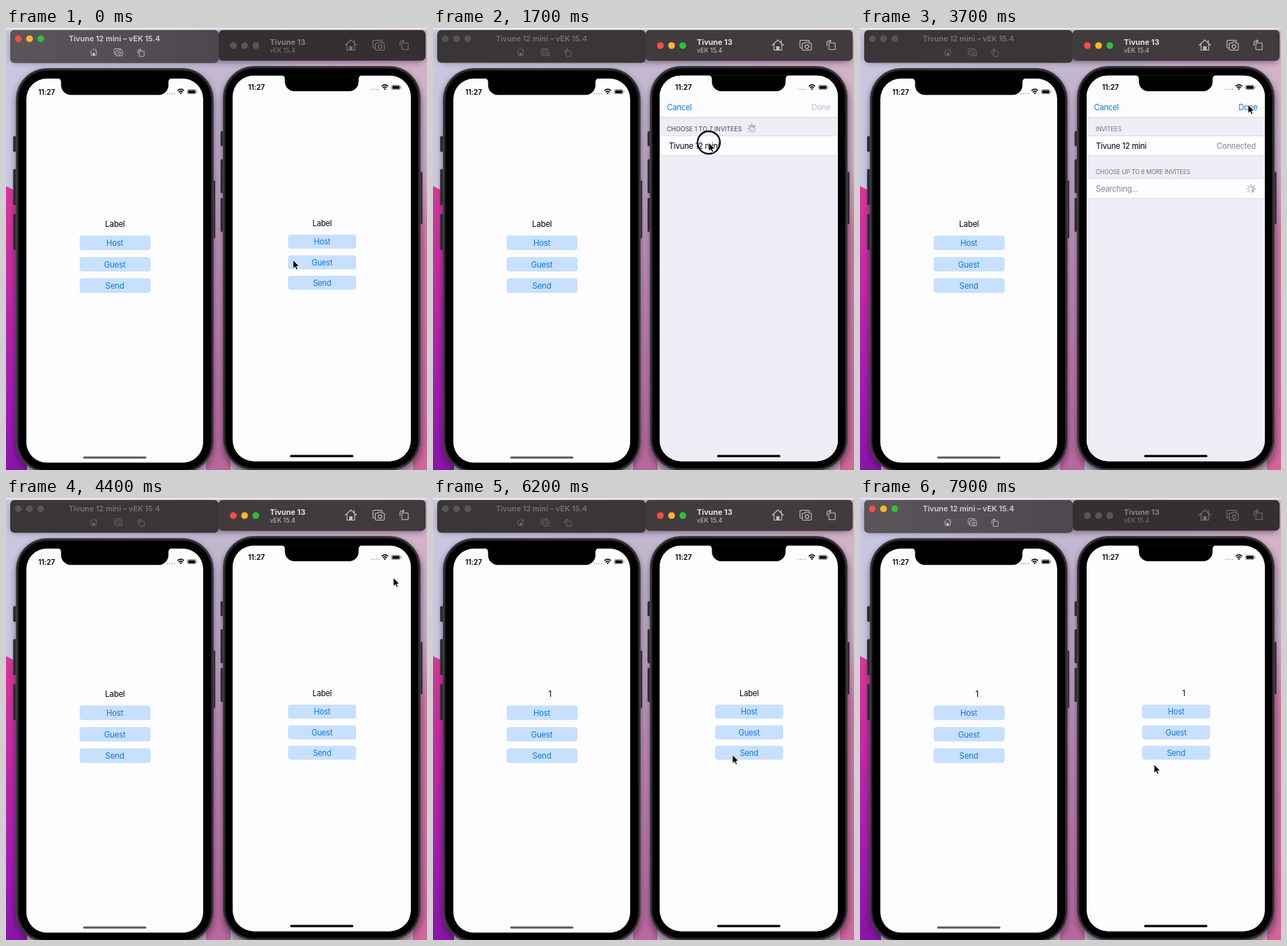
An HTML page for the animation above (8000 ms loop, 600x629 px).

```html
<!DOCTYPE html>
<html lang="en">
<head>
<meta charset="utf-8">
<title>Two simulators</title>
<style>
html, body { margin: 0; width: 100%; height: 100%; overflow: hidden; background: #b7aecb; }
svg { display: block; width: 600px; height: 629px; }
text { font-family: Inter, "Open Sans", sans-serif; }

.mini text { font-size: 11.4px; letter-spacing: -.22px; }
.big text { font-size: 11.1px; letter-spacing: -.2px; }
.mid text, text.mid { text-anchor: middle; }
.end { text-anchor: end; }
.blue { fill: #0f78e2; }
.grey { fill: #858488; }
.pale { fill: #bdbcc3; }
g.head text { font-size: 8.46px; letter-spacing: -.14px; fill: #737278; }
g.head text.wide { font-size: 8.8px; letter-spacing: 0; fill: #454449; }
.clock text { font-size: 10.3px; font-weight: 600; letter-spacing: -.1px; text-anchor: middle; }
.btn { fill: #c7e0fe; }
.title { font-size: 10.8px; font-weight: 600; }
.strong { font-weight: 700; }
.sub { font-size: 9px; }
.icon { fill: none; stroke: currentColor; stroke-width: 1.1; stroke-linejoin: round; stroke-linecap: round; }

/* Hard switches and motion share one 8 s clock */
.sw { animation: 8s step-end infinite; }
.move { animation: 8s ease-in-out infinite; }
.leftOn { animation-name: leftOn; }
.rightOn { animation-name: rightOn; }
.leftOld { animation-name: leftOld; }
.leftNew { animation-name: leftNew; }
.rightOld { animation-name: rightOld; }
.rightNew { animation-name: rightNew; }
.choose { animation-name: choose; }
.joined { animation-name: joined; }
.connecting { animation-name: connecting; }
.connected { animation-name: connected; }
.ring { animation-name: ring; }
.sheet { animation-name: sheet; }
.pointer { animation-name: pointer; }
.spin { animation: spin 1s steps(8) infinite; }

@keyframes leftOn { 0% { opacity: 1 } 2.5% { opacity: 0 } 88.75%, 100% { opacity: 1 } }
@keyframes rightOn { 0% { opacity: 0 } 2.5% { opacity: 1 } 88.75%, 100% { opacity: 0 } }
@keyframes leftOld { 0% { opacity: 1 } 72.5%, 100% { opacity: 0 } }
@keyframes leftNew { 0% { opacity: 0 } 72.5%, 100% { opacity: 1 } }
@keyframes rightOld { 0% { opacity: 1 } 90%, 100% { opacity: 0 } }
@keyframes rightNew { 0% { opacity: 0 } 90%, 100% { opacity: 1 } }
@keyframes choose { 0% { opacity: 1 } 22.5%, 100% { opacity: 0 } }
@keyframes joined { 0% { opacity: 0 } 22.5%, 100% { opacity: 1 } }
@keyframes connecting { 0% { opacity: 1 } 27.5%, 100% { opacity: 0 } }
@keyframes connected { 0% { opacity: 0 } 27.5%, 100% { opacity: 1 } }
@keyframes ring {
  0% { opacity: 0 } 1.25% { opacity: 1 } 3.75% { opacity: 0 }
  20% { opacity: 1 } 22.5% { opacity: 0 }
  47.5% { opacity: 1 } 50% { opacity: 0 }
  68.75% { opacity: 1 } 71.25% { opacity: 0 }
  87.5% { opacity: 1 } 90%, 100% { opacity: 0 }
}
@keyframes sheet {
  0%, 5% { transform: translateY(550px); animation-timing-function: cubic-bezier(.2, .7, .4, 1) }
  11.25% { transform: translateY(10px); animation-timing-function: ease-out }
  12.5%, 50% { transform: translateY(0); animation-timing-function: cubic-bezier(.3, .5, .3, 1) }
  56.25%, 100% { transform: translateY(550px) }
}
@keyframes pointer {
  0%, 3.75% { transform: translate(409px, 330px) }
  8.75%, 12.5% { transform: translate(420px, 329px) }
  19%, 33.75% { transform: translate(393px, 163px) }
  43.75%, 54% { transform: translate(553px, 109px) }
  65%, 73.75% { transform: translate(487px, 364px) }
  86.25%, 90% { transform: translate(167px, 371px) }
  97.5%, 100% { transform: translate(419px, 379px) }
}
@keyframes spin { to { transform: rotate(360deg) } }
</style>
</head>
<body>
<svg viewBox="0 0 600 629" xmlns="http://www.w3.org/2000/svg">
<defs>
  <linearGradient id="sky">
    <stop offset="0" stop-color="#c9c7e0"/><stop offset=".5" stop-color="#c3b7d0"/><stop offset="1" stop-color="#d2b2c8"/>
  </linearGradient>
  <linearGradient id="flame" x2="0" y2="1">
    <stop offset="0" stop-color="#d8379a"/><stop offset=".35" stop-color="#c12aa4"/><stop offset=".75" stop-color="#a01bb2"/><stop offset="1" stop-color="#8915a6"/>
  </linearGradient>
  <linearGradient id="gap" x2="0" y2="1">
    <stop offset="0" stop-color="#c3b7d0"/><stop offset=".25" stop-color="#bda4c4"/><stop offset=".5" stop-color="#c08ab2"/><stop offset="1" stop-color="#b8679c"/>
  </linearGradient>
  <linearGradient id="edge" x2="0" y2="1">
    <stop offset="0" stop-color="#d2b2c8"/><stop offset=".18" stop-color="#cfaecb"/><stop offset=".36" stop-color="#cf7ba6"/><stop offset="1" stop-color="#d2669c"/>
  </linearGradient>
  <linearGradient id="barLit"><stop offset="0" stop-color="#5b555a"/><stop offset="1" stop-color="#4d484d"/></linearGradient>
  <filter id="soft" x="-20%" y="-10%" width="140%" height="120%"><feGaussianBlur stdDeviation="5"/></filter>
  <clipPath id="bigScreen"><rect x="323" y="67.800" width="254" height="548.600" rx="30"/></clipPath>

  <g id="home" class="icon">
    <path d="M-8 0 L0 -7.5 L8 0 M-5.5 -1.5 V7 H5.5 V-1.5 M4.8 -3.5 V-7"/>
    <path d="M-1.7 7 V2 H1.7 V7" fill="currentColor"/>
  </g>
  <g id="shot" class="icon">
    <path d="M-5.5 4 H-6.5 Q-8 4 -8 2.5 V-5.5 Q-8 -7 -6.5 -7 H4 Q5.5 -7 5.5 -5.5 V-5"/>
    <path d="M-3.5 -3 H-1 L0 -4.5 H4 L5 -3 H7 Q8.2 -3 8.2 -1.8 V5.8 Q8.2 7 7 7 H-3.3 Q-4.7 7 -4.7 5.8 V-1.8 Q-4.7 -3 -3.5 -3 Z"/>
    <circle cx="2" cy="2" r="2.6"/>
  </g>
  <g id="turn" class="icon">
    <rect x="-3.5" y="-2.8" width="9.5" height="10" rx="1"/>
    <path d="M-6.3 1 V-3 Q-6.3 -5.8 -3.5 -5.8 H-.5 M-2 -7.5 L-.3 -5.8 L-2 -4.1"/>
  </g>

  <g id="leftBar" fill="currentColor">
    <text class="title mid" x="154.5" y="18.7">Tivune 12 mini – vEK 15.4</text>
    <use href="#home" transform="translate(125 34.5) scale(.65)"/>
    <use href="#shot" transform="translate(160 34.5) scale(.72)"/>
    <use href="#turn" transform="translate(192.5 35) scale(.74)"/>
  </g>
  <g id="rightBar" fill="currentColor">
    <text class="title strong" x="376" y="23.6">Tivune 13</text>
    <text class="sub" x="376" y="34.5" opacity=".8">vEK 15.4</text>
    <g opacity=".82">
      <use href="#home" transform="translate(491.5 24.5)"/>
      <use href="#shot" transform="translate(531 24.5)"/>
      <use href="#turn" transform="translate(567.5 24) scale(.95)"/>
    </g>
  </g>

  <g id="lamps"><circle r="4.800"/><circle cx="16" r="4.800"/><circle cx="32" r="4.800"/></g>
  <g id="lit"><circle r="4.800" fill="#fb4b4c"/><circle cx="16" r="4.800" fill="#fdb62b"/><circle cx="32" r="4.800" fill="#2bc23c"/></g>

  <g id="status">
    <g fill="#aaa9ad"><circle cx="-19" cy="3" r=".9"/><circle cx="-15.7" cy="3" r=".9"/><circle cx="-12.4" cy="3" r=".9"/><circle cx="-9.1" cy="3" r=".9"/></g>
    <path d="M-4.6 -1.3 Q0 -5.4 4.6 -1.3 M-2.8 .9 Q0 -1.6 2.8 .9" fill="none" stroke="#111" stroke-width="1.6"/>
    <path d="M-1.7 2.1 Q0 .7 1.7 2.1 L0 4 Z" fill="#111"/>
    <rect x="9.4" y="-3" width="12.6" height="6.4" rx="1.8" fill="none" stroke="#858488" stroke-width=".8"/>
    <rect x="10.5" y="-2" width="10.4" height="4.4" rx="1" fill="#111"/>
    <path d="M23 -1 V1.4" stroke="#858488"/>
  </g>

  <path id="spoke" d="M0 -2.6 V-6" stroke="#69686e" stroke-width="1.3" stroke-linecap="round"/>
  <g id="spinner"><g class="spin">
    <use href="#spoke"/>
    <use href="#spoke" transform="rotate(45)" opacity=".3"/>
    <use href="#spoke" transform="rotate(90)" opacity=".35"/>
    <use href="#spoke" transform="rotate(135)" opacity=".42"/>
    <use href="#spoke" transform="rotate(180)" opacity=".5"/>
    <use href="#spoke" transform="rotate(225)" opacity=".6"/>
    <use href="#spoke" transform="rotate(270)" opacity=".72"/>
    <use href="#spoke" transform="rotate(315)" opacity=".86"/>
  </g></g>
</defs>

<!-- Desktop -->
<rect width="600" height="629" fill="url(#sky)"/>
<path d="M0 225 L30 240 V629 H0 Z" fill="url(#flame)"/>
<rect x="285" y="100" width="35" height="529" fill="url(#gap)"/>
<rect x="580" y="100" width="20" height="529" fill="url(#edge)"/>
<g filter="url(#soft)" fill="#1b1020" opacity=".5">
  <rect x="14" y="62" width="282" height="576" rx="44"/>
  <rect x="309" y="60" width="283" height="576" rx="44"/>
  <rect x="8" y="10" width="588" height="38" rx="7"/>
</g>
<rect width="600" height="2" fill="#ebe8f0"/>

<!-- Small phone -->
<g fill="#2b292c" stroke="#464448" stroke-width=".6">
  <rect x="10.3" y="154" width="5" height="22" rx="1.5"/>
  <rect x="10.3" y="201" width="5" height="51" rx="1.5"/>
  <rect x="10.3" y="265" width="5" height="51" rx="1.5"/>
  <rect x="293.5" y="217" width="4.5" height="82" rx="1.5"/>
</g>
<rect x="14.5" y="57.5" width="281" height="575" rx="44" fill="#302e31" stroke="#4b494e"/>
<rect x="17.5" y="60.5" width="275" height="569" rx="41" stroke="#19181a"/>
<rect x="29" y="72" width="252" height="546.500" rx="29" fill="#fdfcfe"/>
<path d="M73.500 71.500 Q78.500 72 78.500 77 V81 A14 14 0 0 0 92.500 95.300 H217.500 A14 14 0 0 0 231.500 81 V77 Q231.500 72 236.500 71.500 Z"/>
<g class="clock"><text x="58" y="94.500">11:27</text></g>
<use href="#status" x="249" y="90.500"/>
<path d="M111.500 611.300 H198.500" stroke="#5c5b5e" stroke-width="3" stroke-linecap="round"/>
<g class="mini mid">
  <text class="sw leftOld" x="155.300" y="282.700">Label</text>
  <rect class="btn" x="105" y="295.300" width="101" height="20.600" rx="4"/>
  <rect class="btn" x="105" y="326" width="101" height="20.600" rx="4"/>
  <rect class="btn" x="105" y="356.300" width="101" height="20.600" rx="4"/>
  <g class="blue">
    <text x="155" y="310">Host</text>
    <text x="155" y="340.500">Guest</text>
    <text x="155" y="370.700">Send</text>
  </g>
  <text class="sw leftNew" x="166.800" y="282.700">1</text>
</g>

<!-- Large phone -->
<g fill="#2b292c" stroke="#464448" stroke-width=".6">
  <rect x="306" y="147" width="5" height="21" rx="1.5"/>
  <rect x="306" y="187" width="5" height="48" rx="1.5"/>
  <rect x="306" y="242" width="5" height="48" rx="1.5"/>
  <rect x="588.800" y="205" width="4.500" height="74" rx="1.5"/>
</g>
<rect x="309.500" y="54.500" width="281" height="575" rx="44" fill="#302e31" stroke="#4b494e"/>
<rect x="312.500" y="57.500" width="275" height="569" rx="41" stroke="#19181a"/>
<g clip-path="url(#bigScreen)" class="big">
  <rect x="323" y="67" width="254" height="550" fill="#fdfcfe"/>
  <g class="mid">
    <text class="sw rightOld" x="450.600" y="281.500">Label</text>
    <rect class="btn" x="402" y="294" width="97" height="20" rx="4"/>
    <rect class="btn" x="402" y="323.400" width="97" height="20" rx="4"/>
    <rect class="btn" x="402" y="352.600" width="97" height="20" rx="4"/>
    <g class="blue">
      <text x="450.500" y="308">Host</text>
      <text x="450.500" y="337.500">Guest</text>
      <text x="450.500" y="366.700">Send</text>
    </g>
    <text class="sw rightNew" x="461.500" y="281.500">1</text>
  </g>

  <!-- Invitation sheet -->
  <g class="move sheet">
    <rect x="323" y="67" width="254" height="560" fill="#efeef6"/>
    <rect x="323" y="57" width="254" height="70" fill="#fcfbfd"/>
    <path d="M323 127.300 H577" stroke="#cfced5" stroke-width=".8"/>
    <text class="blue" x="333.500" y="117">Cancel</text>
    <rect x="323" y="153.500" width="254" height="28" fill="#fdfcfe" stroke="#d9d8de" stroke-width=".7"/>
    <text x="336.300" y="171.900">Tivune 12 mini</text>
    <g class="sw choose">
      <text class="pale end" x="566.500" y="117">Done</text>
      <g class="head"><text class="wide" x="333" y="146.500">CHOOSE 1 TO 7 INVITEES</text></g>
      <use href="#spinner" x="454.500" y="143"/>
    </g>
    <g class="sw joined">
      <text class="blue end" x="566.500" y="117">Done</text>
      <g class="head">
        <text x="336" y="147">INVİTEES</text>
        <text x="336" y="208">CHOOSE UP TO 6 MORE İNVİTEES</text>
      </g>
      <g class="sw connecting"><text class="grey end" x="564" y="171.900">Connecting...</text></g>
      <g class="sw connected"><text class="grey end" x="564" y="171.900">Connected</text></g>
      <rect x="323" y="214.500" width="254" height="28" fill="#fdfcfe" stroke="#d9d8de" stroke-width=".7"/>
      <text class="grey" x="336.300" y="233">Searching...</text>
      <use href="#spinner" x="557" y="229"/>
    </g>
  </g>
</g>
<path d="M392.500 67.300 Q397.500 67.800 397.500 73 V76.500 A13.500 13.500 0 0 0 411 90 H489 A13.500 13.500 0 0 0 502.500 76.500 V73 Q502.500 67.800 507.500 67.300 Z"/>
<g class="clock"><text x="357" y="88">11:27</text></g>
<use href="#status" x="540" y="84.300"/>
<path d="M406.500 609.200 H493.500" stroke="#050505" stroke-width="3.200" stroke-linecap="round"/>

<!-- Window bars -->
<rect x="6" y="3" width="297" height="46.500" rx="6" fill="#3a3537"/>
<use href="#lamps" x="17.500" y="15.300" fill="#595456"/>
<use href="#leftBar" color="#777174"/>
<g class="sw leftOn">
  <rect x="6" y="3" width="297" height="46.500" rx="6" fill="url(#barLit)"/>
  <use href="#lit" x="17.500" y="15.300"/>
  <use href="#leftBar" color="#d5d0d4"/>
</g>
<rect x="303" y="3" width="295" height="43.500" rx="6" fill="#352f32"/>
<use href="#lamps" x="324" y="25" fill="#5b5558"/>
<use href="#rightBar" color="#898386"/>
<g class="sw rightOn">
  <rect x="303" y="3" width="295" height="43.500" rx="6" fill="#413b3d"/>
  <use href="#lit" x="324" y="25"/>
  <use href="#rightBar" color="#e6e2e4"/>
</g>

<!-- Pointer -->
<g class="move pointer">
  <circle class="sw ring" r="16" fill="none" stroke="#0b0b0d" stroke-width="2.300"/>
  <path d="M0 0 V12.500 L2.900 9.900 L4.900 14.300 L7 13.300 L5.100 9.100 H9 Z" fill="#050505" stroke="#fff" stroke-width=".9" stroke-linejoin="round"/>
</g>
</svg>
</body>
</html>
```
